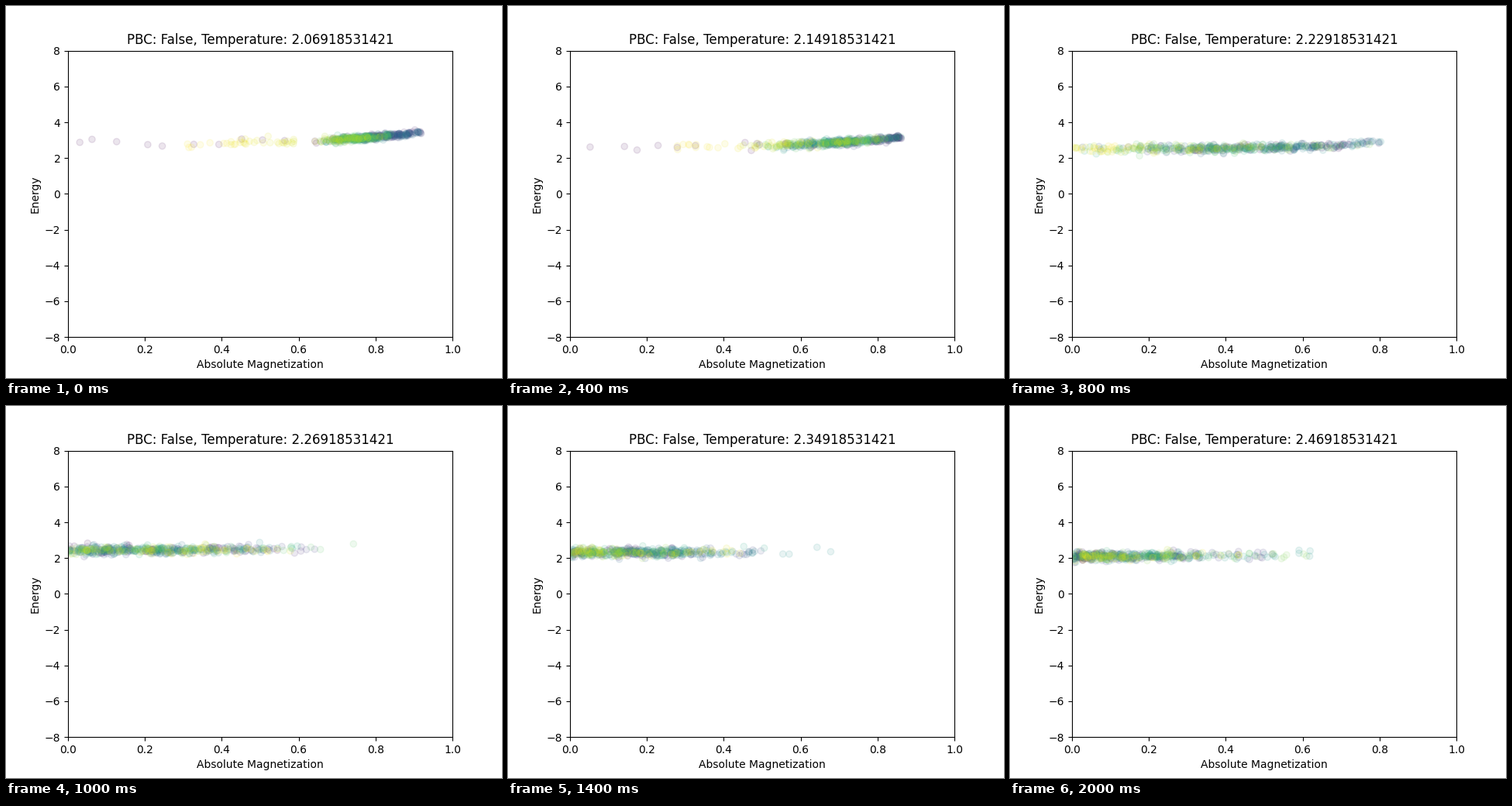
Animation, 640 px wide and 480 px high, one loop 2.1 s. Source, as a matplotlib script:

```python
import numpy as np
import matplotlib.pyplot as plt
from matplotlib.animation import FuncAnimation

STEPS, SAMPLES = 21, 500
T0, DT = 2.06918531421, 0.02


def sigmoid(x):
    return 1 / (1 + np.exp(-x))


def correlated_noise(rng, n, phi=0.9):
    noise = rng.normal(0, 1, n)
    for i in range(1, n):
        noise[i] = phi * noise[i - 1] + np.sqrt(1 - phi**2) * noise[i]
    return noise


def simulate(step):
    """Magnetization and energy samples at one temperature."""
    rng = np.random.default_rng(100 + step)
    t = np.linspace(0, 1, SAMPLES)

    # Order melts away around the critical point while fluctuations grow.
    level = 0.78 * sigmoid((8 - step) / 2)
    spread = 0.05 + 0.16 * sigmoid((step - 5.5) / 1.5)
    top = 0.92 - 0.0145 * step

    # Each run starts disordered, overshoots, and drops again at its end.
    run = 1.1 - 0.13 * t - 1.1 * np.exp(-t / 0.02) - 0.5 * np.exp((t - 1) / 0.06)
    mag = np.abs(level * run + spread * correlated_noise(rng, SAMPLES))
    mag = np.abs(top - np.abs(top - mag))

    energy = 2.8 - 0.035 * step + 0.9 * mag**4
    energy += rng.normal(0, 0.125, SAMPLES) * (1 - 0.65 * mag**2)
    return np.column_stack([mag, energy])


fig, ax = plt.subplots(figsize=(6.4, 4.8), dpi=100)
ax.set(xlim=(0, 1), ylim=(-8, 8),
       xlabel="Absolute Magnetization", ylabel="Energy")
title = ax.set_title("")
points = ax.scatter(*simulate(0).T, c=np.arange(SAMPLES),
                    cmap="viridis", alpha=0.1)


def update(step):
    points.set_offsets(simulate(step))
    title.set_text(f"PBC: False, Temperature: {T0 + DT * step:.11f}")
    return points, title


anim = FuncAnimation(fig, update, frames=STEPS, interval=100, repeat=True)
plt.show()
```
